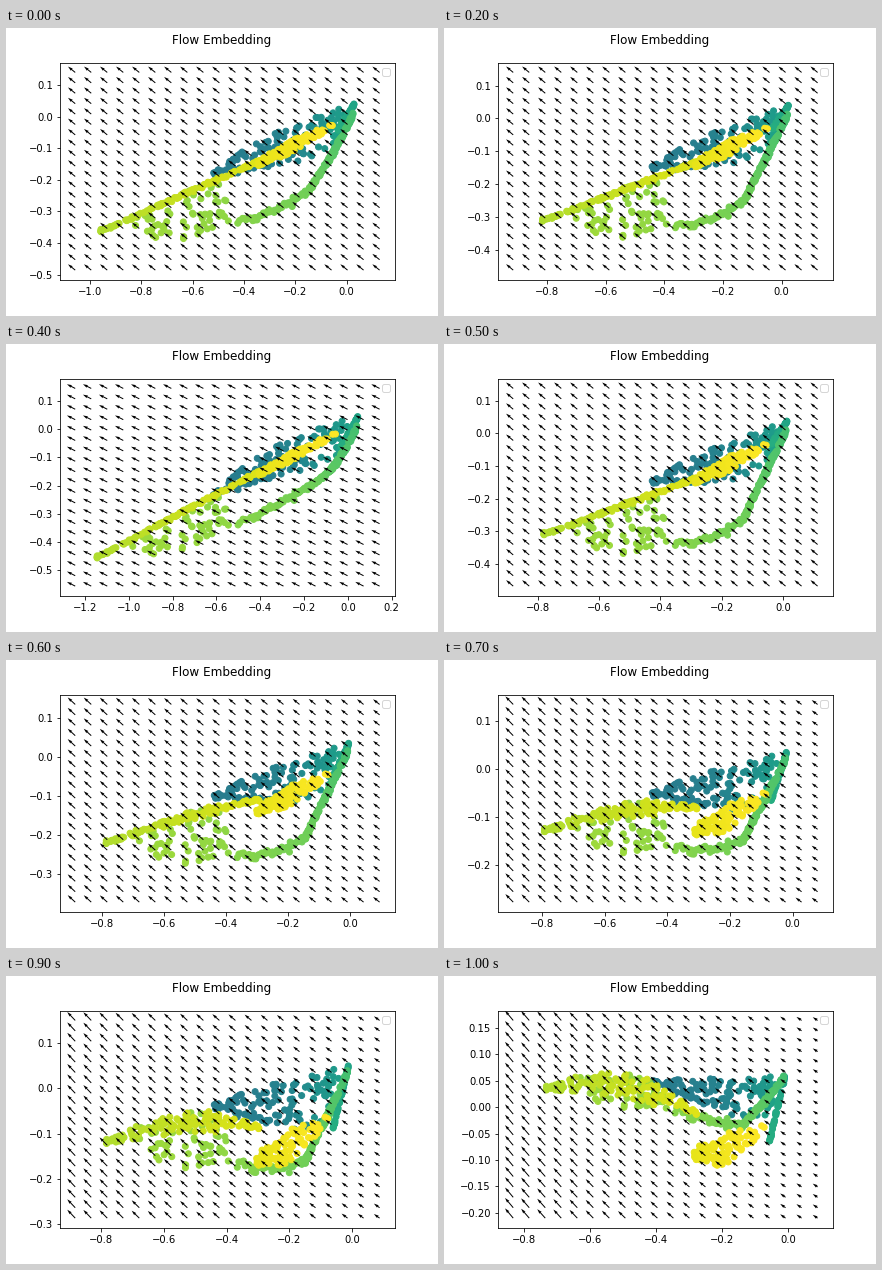
Recreate the animation shown at these times as a matplotlib script. Size 432x288 px, loop 1100 ms.

```python
import numpy as np
import matplotlib.pyplot as plt
from matplotlib.animation import FuncAnimation

FRAMES = 11
PAD = 0.1  # room around the points, in data units
GRID = 20

# Step: x range, y range of the points, weight of the long and folded shapes
POSES = {
    1: (-0.958, 0.029, -0.386, 0.040, 0.40, 0.00),
    2: (-0.815, 0.023, -0.361, 0.040, 0.08, 0.00),
    4: (-1.144, 0.045, -0.457, 0.045, 1.00, 0.00),
    5: (-0.779, 0.011, -0.368, 0.037, 0.00, 0.00),
    7: (-0.792, -0.020, -0.177, 0.035, 0.00, 0.56),
    8: (-0.834, -0.012, -0.262, 0.034, 0.00, 0.33),
    10: (-0.732, -0.012, -0.110, 0.064, 0.00, 1.00),
}

rng = np.random.default_rng(7)


def key(x, y_open, y_long, y_fold):
    """A landmark: one x and its height in each of the three shapes."""
    return np.array([x, y_open, y_long, y_fold])


def through(path, u):
    """Quadratic curve through three landmarks."""
    a, b, c = path
    u = u[:, None]
    return (1 - u) * (1 - 2 * u) * a + 4 * u * (1 - u) * b + u * (2 * u - 1) * c


def cloud(n, upper, lower, spread, start=0.0, reach=1.0, mix=(1, 1)):
    """Seeded points between two curves, and their positions along them."""
    u = np.sort(rng.uniform(start, 1, n))
    v = rng.beta(*mix, n)[:, None]
    pts = through(upper, u * reach) * (1 - v) + through(lower, u) * v
    pts[:, 0] += rng.normal(0, spread, n)
    pts[:, 1:] += rng.normal(0, spread, (n, 1))
    return pts, u


def build():
    tip = key(0.009, 0.037, 0.045, 0.064)
    teal_end = key(-0.424, -0.150, -0.237, 0.049)
    teal_top = teal_end, key(-0.235, -0.055, -0.067, 0.051), tip
    teal_low = (teal_end, key(-0.21, -0.150, -0.163, -0.004),
                key(-0.05, -0.080, -0.095, -0.017))
    tail_end = key(-0.042, -0.034, -0.063, -0.066)
    tail = tip, (tip + tail_end) / 2, tail_end

    elbow = key(-0.13, -0.257, -0.195, -0.034)
    strand = (key(0.008, 0.009, 0.011, 0.060),
              key(-0.061, -0.122, -0.127, 0.009), elbow)
    arc_end = key(-0.35, -0.339, -0.336, -0.006)
    arc = elbow, key(-0.23, -0.318, -0.266, -0.027), arc_end

    left = key(-0.779, -0.312, -0.457, 0.034)
    right = key(-0.28, -0.138, -0.148, -0.013)
    ridge = left, key(-0.53, -0.223, -0.301, 0.066), right
    ridge_low = left, key(-0.53, -0.228, -0.303, 0.022), right
    base = (key(-0.60, -0.358, -0.450, 0.008),
            key(-0.48, -0.367, -0.408, -0.002), arc_end)

    gold_ends = key(-0.295, -0.150, -0.163, -0.089), key(-0.05, -0.034, -0.013, -0.036)
    gold_top = gold_ends[0], key(-0.19, -0.076, -0.085, -0.051), gold_ends[1]
    gold_low = gold_ends[0], key(-0.19, -0.119, -0.109, -0.108), gold_ends[1]

    # cloud, first colour, last colour, easing of the colour
    parts = [
        (cloud(125, teal_top, teal_low, 0.003, mix=(0.6, 0.8)), 0.42, 0.58, 3),
        (cloud(45, tail, tail, 0.001), 0.58, 0.62, 1),
        (cloud(140, strand, strand, 0.002), 0.70, 0.78, 1),
        (cloud(65, arc, arc, 0.004), 0.78, 0.82, 1),
        (cloud(60, ridge, base, 0.003, start=0.14, reach=0.75), 0.86, 0.83, 1),
        (cloud(120, ridge, ridge_low, 0.002), 0.88, 0.95, 1),
        (cloud(95, gold_top, gold_low, 0.003), 0.96, 1.0, 1),
    ]
    pts = np.concatenate([p[0] for p, *_ in parts])
    tint = np.concatenate([lo + (hi - lo) * p[1] ** e for p, lo, hi, e in parts])
    return pts, tint


POINTS, TINT = build()


def pose(n):
    """Pose at step n; the first one is held for two steps."""
    return [np.interp(n, list(POSES), col) for col in zip(*POSES.values())]


def fit(values, lo, hi):
    """Rescale values to fill the range lo..hi."""
    return lo + (values - values.min()) / np.ptp(values) * (hi - lo)


def arrows(x0, x1, y0, y1, stretch, fold):
    x, y = np.meshgrid(np.linspace(x0 - PAD, x1 + PAD, GRID),
                       np.linspace(y0 - PAD, y1 + PAD, GRID))
    f = (x - x.min()) / np.ptp(x)
    angle = np.radians(140 + 13 * stretch ** 3 + fold * (16 * f - 10))
    length = 1 + 0.37 * fold * (1 - 2 * f)
    return x, y, length * np.cos(angle), length * np.sin(angle)


def padded(lo, hi):
    """Axis range: the arrow grid plus a margin of 5 percent."""
    margin = 0.05 * (hi - lo + 2 * PAD)
    return lo - PAD - margin, hi + PAD + margin


fig, ax = plt.subplots(figsize=(6, 4), dpi=72)
fig.subplots_adjust(left=0.125, right=0.9, bottom=0.125, top=0.88)
fig.suptitle("Flow Embedding", fontsize=12)


def draw(n):
    ax.clear()
    x0, x1, y0, y1, stretch, fold = pose(n)
    height = POINTS[:, 1:] @ [1 - stretch - fold, stretch, fold]
    ax.scatter(fit(POINTS[:, 0], x0, x1), fit(height, y0, y1),
               c=TINT, cmap="viridis", vmin=0, vmax=1)
    ax.quiver(*arrows(x0, x1, y0, y1, stretch, fold))
    ax.set_xlim(*padded(x0, x1))
    ax.set_ylim(*padded(y0, y1))
    ax.legend([], [], loc="upper right")


anim = FuncAnimation(fig, draw, frames=FRAMES, interval=100,
                     repeat=True, repeat_delay=0)
plt.show()
```
